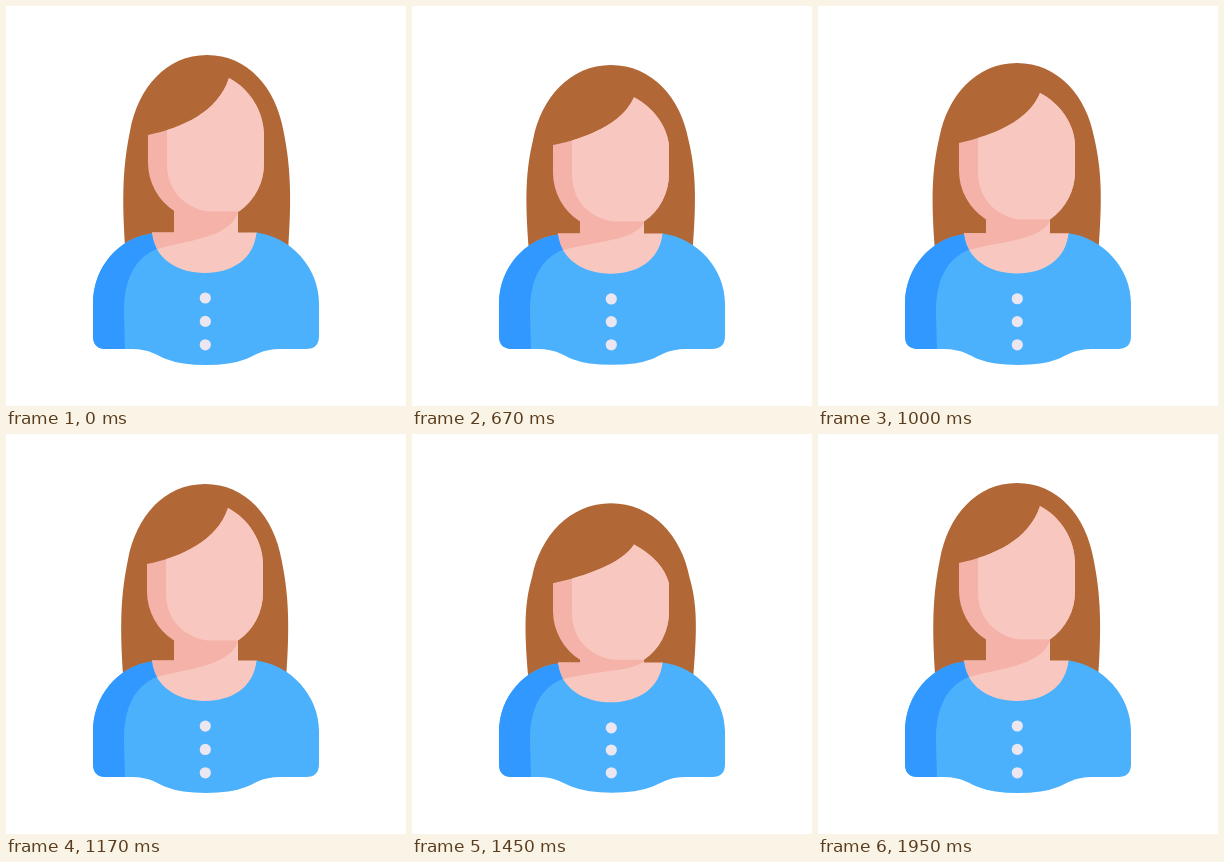
Recreate the animation shown at these times as an HTML page. Size 400 by 400 pixels, loop 1970 ms.

```html
<!DOCTYPE html>
<html lang="en">
<head>
<meta charset="utf-8">
<title>Nodding woman</title>
<style>
  html, body { margin: 0; width: 100%; height: 100%; overflow: hidden; background: #fff; }
  svg { display: block; width: 100vw; height: 100vh; }
  .hair { fill: #b16836; }
  .skin { fill: #f8c8c0; }
  .shade { fill: #f5b2a9; }
  .shirt { fill: #4cb1fd; }
  .sleeve { fill: #3098ff; }
  .button { fill: #ebe6ef; }
</style>
</head>
<body>
<svg viewBox="0 0 400 400">
  <defs>
    <clipPath id="faceClip"><path id="faceEdge"/></clipPath>
    <clipPath id="bodyClip"><use href="#torso"/></clipPath>
  </defs>
  <path id="hair" class="hair"/>
  <path id="neck" class="skin"/>
  <path id="neckShade" class="shade"/>
  <g id="head">
    <path id="face" class="shade"/>
    <path id="cheek" class="skin" clip-path="url(#faceClip)"/>
  </g>
  <g id="body">
    <path id="torso" class="shirt" d="M146 227.5 C112 232 87 262 87 297 V330 Q87 343 100 343 H126
      C144 343 152 350 160 353 Q175 359 200 359 Q225 359 240 353 C248 350 256 343 274 343
      H300 Q313 343 313 330 V297 C313 262 285 231 250.500 226.500 C248 253 226 267 199 267 C172 267 149 253 146 227.500 Z"/>
    <path class="sleeve" clip-path="url(#bodyClip)" d="M146 220 L151 243 C128 252 118 275 118 306 L119 345 H80 V220 Z"/>
  </g>
  <g id="buttons" class="button">
    <circle cx="199.300" r="5.600"/><circle cx="199.300" r="5.600"/><circle cx="199.300" r="5.600"/>
  </g>
</svg>
<script>
const LOOP = 1970, START = 520, DEPTH = 20.5;
const nodKeys = [[520, 0], [825, 1], [1130, 0], [1430, 1], [1950, 0]];
const $ = id => document.getElementById(id);
const setPath = (id, d) => $(id).setAttribute('d', d);
const smooth = u => u * u * (3 - 2 * u);

// 0 is upright, 1 is fully bowed; the last rise settles slowly.
function nodAt(time) {
  for (let i = 1; i < nodKeys.length; i++) {
    const [t0, a] = nodKeys[i - 1], [t1, b] = nodKeys[i];
    if (time < t0 || time >= t1) continue;
    let u = (time - t0) / (t1 - t0);
    if (i === nodKeys.length - 1) u = 1 - (1 - u) ** 1.376;
    return a + (b - a) * smooth(u);
  }
  return 0;
}

function drawHair(n, shift) {
  const drop = DEPTH * n;
  const wide = 2 * n;
  const L = (x, y) => `${x - wide + shift} ${y}`;
  const R = (x, y) => `${x + wide + shift} ${y}`;
  const C = (x, y) => `${x + shift} ${y}`;
  const knee = 125 + drop * 0.9;
  const top = 49 + drop;
  setPath('hair', `M${L(117.5 + n, 246)} C${L(113.5, 190)} ${L(115, 160 + 8 * n)} ${L(122, knee)}
    C${L(130, 82 + drop)} ${C(158, top)} ${C(199, top)}
    C${C(240, top)} ${R(268, 82 + drop)} ${R(275.5, knee)}
    C${R(282.5, 160 + 8 * n)} ${R(284, 190)} ${R(280 - n, 246)} Z`);
}

function drawFace(n, shift) {
  const drop = DEPTH * n;
  const tip = 72 + 1.9 * drop;
  const brow = 129 + drop;
  const jaw = 157 + drop;
  const outline = `M141 ${brow} C${175 - n} ${122 + drop} ${211 - n} ${106 + 1.15 * drop} 222 ${tip}
    C${243 - 2 * n} ${83 + 1.85 * drop} ${257 - 4 * n} ${106 + 1.4 * drop} 257 ${brow}
    V${jaw} A58 58 0 0 1 232 ${205.5 + drop} H168 A58 58 0 0 1 141 ${jaw} Z`;
  setPath('face', outline);
  setPath('faceEdge', outline);
  setPath('cheek', `M160 60 V${jaw + 1} C160 ${188 + drop} 182 ${207 + drop} 216 ${207 + drop}
    Q225 ${207 + drop} 233 ${205.5 + drop} H260 V60 Z`);
  $('head').setAttribute('transform', `translate(${shift} 0)`);
}

function drawNeck(n) {
  const drop = DEPTH * n;
  const sink = 2 * n;
  const collar = 226.5 + sink;
  const chin = 205 + drop;
  setPath('neck', `M168 200 H232 V${collar} H251 V260 L199 272 L146 260 V${collar} H168 Z`);
  setPath('neckShade', `M168 ${Math.min(chin, collar) - 4} H232 V${chin + 2}
    C${222 - 2 * n} ${233 + 0.25 * drop} ${180 + 6 * n} ${234 + sink} 150 ${243.5 + sink}
    H146 V${collar} H168 Z`);
}

function drawBody(n) {
  const scale = 1 - 2 * n / 116;
  $('body').setAttribute('transform', `translate(0 ${343 * (1 - scale)}) scale(1 ${scale})`);
  const heights = [292 + 1.9 * n, 315.4 + 0.6 * n, 338.8];
  [...$('buttons').children].forEach((dot, i) => dot.setAttribute('cy', heights[i]));
}

function draw(time) {
  const n = nodAt(time);
  const resting = time < START;
  drawHair(n, resting ? 2 : 0);
  drawFace(n, resting ? 1 : 0);
  drawNeck(n);
  drawBody(n);
}

const begin = performance.now();
function tick() {
  draw((performance.now() - begin) % LOOP);
  requestAnimationFrame(tick);
}
tick();
</script>
</body>
</html>
```
